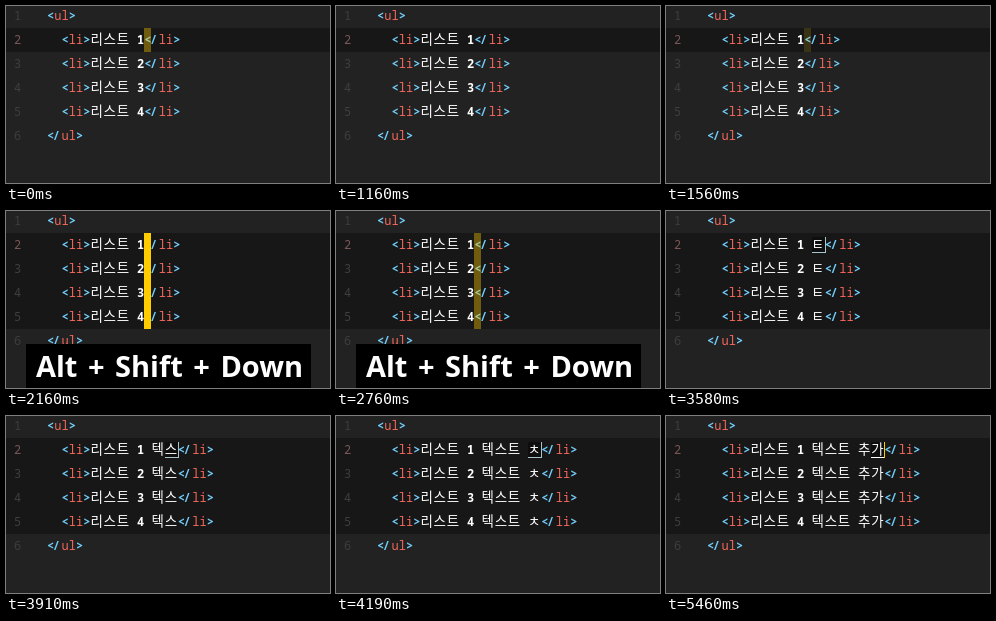
Write an HTML page with a canvas that moves like this. It is 324x177 px and loops after 5.53 s.

```html
<!DOCTYPE html>
<html lang="ko">
<head>
<meta charset="utf-8">
<title>Multi-cursor typing</title>
<style>
html, body { margin: 0; width: 100%; height: 100%; overflow: hidden; background: #222; }
canvas { display: block; }
</style>
</head>
<body>
<canvas id="stage" width="324" height="177"></canvas>
<script>
const ctx = document.getElementById('stage').getContext('2d');
const LOOP = 5530, TICK = 70;
const ROW = 24, LEFT = 41, CELL = 7.25, WIDE = 13.1;
const MONO = '12px "Noto Sans Mono", monospace';
const HANGUL_FONT = '300 13.5px "Noto Sans CJK KR", "Noto Sans CJK", sans-serif';
const CAPTION_FONT = '700 29px "Open Sans", sans-serif';
const BG = '#222222', ACTIVE = '#171717', COMPOSE = '#0e0e0e';
const BRACKET = '#72ccf8', TAG = '#f4695c', TEXT = '#ffffff', MARK = '#a8c4cc', CURSOR = '#ffcc00';

// Block cursor: start time, target opacity, number of ticks to get there
const fades = [
  [-70, 0, 4], [540, 1, 4], [950, 0, 4], [1560, 1, 4], [1630, 1, 1],
  [2690, 0, 4], [3380, 1, 1], [3580, 0, 1], [4120, 1, 1], [4190, 0, 1]
];
// When each row gets its cursor
const rowTimes = [0, 1630, 1830, 2160];
// Text typed on every row
const typing = [
  [0, ''], [3380, ' '], [3580, ' ㅌ'], [3710, ' 테'], [3840, ' 텍'],
  [3910, ' 텍스'], [3980, ' 텍슽'], [4050, ' 텍스트'], [4120, ' 텍스트 '],
  [4190, ' 텍스트 ㅊ'], [4260, ' 텍스트 추'], [4330, ' 텍스트 축'], [4400, ' 텍스트 추가']
];

const latest = (list, t) => list.filter(e => e[0] <= t).pop();
const rowTop = i => i * ROW - 2;

function cursorAlpha(t) {
  const [start, target, ticks] = latest(fades, t);
  const k = Math.min(1, (Math.floor((t - start) / TICK) + 1) / ticks);
  return target ? k ** 1.4 : (1 - k) ** 1.4;
}

function box(color, x, y, w, h) {
  ctx.fillStyle = color;
  ctx.fillRect(x, y, w, h);
}

// Draws characters on the editor grid and returns the next x
function write(str, x, y, color, weight = 700) {
  ctx.fillStyle = color;
  for (const c of str) {
    const wide = c > '\u3000';
    ctx.font = wide ? HANGUL_FONT : weight + ' ' + MONO;
    ctx.fillText(c, c === '/' ? x - 1.5 : x, y);
    x += wide ? WIDE : CELL;
  }
  return x;
}

function tag(name, x, y, open) {
  x = write(open, x, y, BRACKET);
  x = write(name, x, y, TAG, 500);
  return write('>', x, y, BRACKET);
}

function item(n, t, typed, since, alpha) {
  const top = rowTop(n), y = top + 16;
  let x = tag('li', LEFT + 2 * CELL, y, '<');
  x = write('리스트 ' + n, x, y, TEXT);
  const composing = n === 1 && typed && !typed.endsWith(' ');
  if (composing) {
    const done = typed.endsWith('가');
    x = write(typed.slice(0, -1), x, y, TEXT);
    const left = Math.round(x);
    box(COMPOSE, left, top + 4, 13, 16);
    x = write(typed.slice(-1), x, y, TEXT);
    box(done ? TEXT : MARK, left, top + 19, 13, 1);
    tag('li', x, y, '</');
    if (Math.floor((t - since) / 530) % 2 === 0) {
      box(done ? CURSOR : MARK, Math.round(x), top + 4, 1, 16);
    }
  } else {
    x = write(typed, x, y, TEXT);
    tag('li', x, y, '</');
  }
  if (t >= rowTimes[n - 1]) {
    ctx.globalAlpha = alpha;
    box(CURSOR, Math.round(x), top, 7, ROW);
    ctx.globalAlpha = 1;
  }
}

function caption(text) {
  box('#000000', 20, 133, 285, 44);
  ctx.font = CAPTION_FONT;
  ctx.fillStyle = TEXT;
  ctx.wordSpacing = '3px';
  ctx.fillText(text, 30, 166);
  ctx.wordSpacing = '0px';
}

function draw(t) {
  box(BG, 0, 0, 324, 177);
  const active = rowTimes.filter(s => s <= t).length;
  box(ACTIVE, 0, rowTop(1), 324, active * ROW);

  for (let i = 0; i < 6; i++) {
    write(String(i + 1), 8, rowTop(i) + 16, i === 1 ? '#7a5656' : '#3e3e3e', 400);
  }

  tag('ul', LEFT, rowTop(0) + 16, '<');
  const [since, typed] = latest(typing, t), alpha = cursorAlpha(t);
  for (let n = 1; n <= 4; n++) item(n, t, typed, since, alpha);
  tag('ul', LEFT, rowTop(5) + 16, '</');

  if (t >= 1630 && t < 2970) caption('Alt + Shift + Down');
}

const begin = performance.now();
function frame() {
  draw((performance.now() - begin) % LOOP);
  requestAnimationFrame(frame);
}
frame();
</script>
</body>
</html>
```
